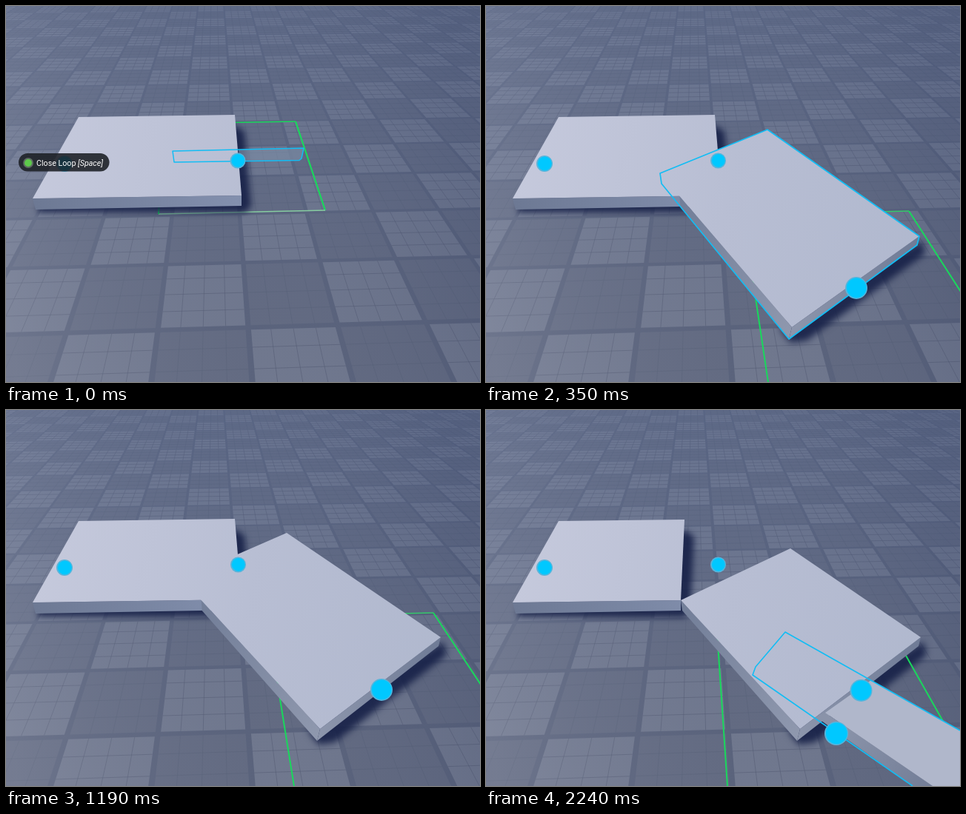
An HTML page with a canvas that plays this animation: 640x508 px, repeating every 2.31 s.

```html
<!DOCTYPE html>
<html lang="en">
<head>
<meta charset="utf-8">
<title>Block tool</title>
<style>
  html, body { margin: 0; width: 100%; height: 100%; overflow: hidden; background: #5d667f; }
  canvas { display: block; }
</style>
</head>
<body>
<canvas id="stage" width="640" height="508"></canvas>
<script>
const W = 640, H = 508, LOOP = 2310, STEP = 70;
const CYAN = '#12bdf4', GREEN = '#19d85c';
const VP = [281, -174];
const stage = document.getElementById('stage').getContext('2d');
let g = stage;

const mix = (a, b, k) => a + (b - a) * k;
const mixAll = (a, b, k) => a.map((v, i) => mix(v, b[i], k));
const mixPt = (a, b, k) => [mix(a[0], b[0], k), mix(a[1], b[1], k)];
const shift = (p, x, y) => [p[0] + x, p[1] + y];
const atY = (a, b, y) => mixPt(a, b, Math.max(0, (y - a[1]) / (b[1] - a[1])));

function trace(pts, closed = true) {
  g.beginPath();
  pts.forEach(p => g.lineTo(p[0], p[1]));
  if (closed) g.closePath();
}
function fill(pts, style) {
  trace(pts);
  g.fillStyle = style;
  g.fill();
}
function line(pts, style, width, closed = false) {
  trace(pts, closed);
  g.strokeStyle = style;
  g.lineWidth = width;
  g.lineJoin = 'round';
  g.stroke();
}
function disc(x, y, r, style) {
  g.beginPath();
  g.arc(x, y, r, 0, Math.PI * 2);
  g.fillStyle = style;
  g.fill();
}
function blend(x0, y0, x1, y1, ...stops) {
  const grad = g.createLinearGradient(x0, y0, x1, y1);
  stops.forEach((c, i) => grad.addColorStop(i / (stops.length - 1), c));
  return grad;
}
function shadow(pts, blur = 4) {
  g.save();
  g.filter = `blur(${blur}px)`;
  fill(pts, 'rgba(23,33,72,.9)');
  g.restore();
}

// Floor plane to screen: u counts columns, v counts rows going away.
function floorPt(u, v) {
  const a = 0.1695 * v, b = 0.006 * u, w = 1 + a + b;
  return [(205 + VP[0] * a + 124 * u) / w, (438 + VP[1] * (a + b)) / w];
}

function makeFloor() {
  const layer = document.createElement('canvas');
  layer.width = W;
  layer.height = H;
  g = layer.getContext('2d');
  g.fillStyle = '#59627b';
  g.fillRect(0, 0, W, H);
  for (let v = -2; v < 18; v++) {
    for (let u = -10; u < 14; u++) {
      const lit = (u + v) % 2 === 0, m = 0.03;
      fill([floorPt(u + m, v + m), floorPt(u + 1 - m, v + m),
            floorPt(u + 1 - m, v + 1 - m), floorPt(u + m, v + 1 - m)],
           lit ? '#70788e' : '#626a81');
      const ink = lit ? 'rgba(82,90,114,.55)' : 'rgba(84,92,116,.4)';
      for (let i = 1; i < 4; i++) {
        const s = i / 4;
        line([floorPt(u + s, v + m), floorPt(u + s, v + 1 - m)], ink, 1);
        line([floorPt(u + m, v + s), floorPt(u + 1 - m, v + s)], ink, 1);
      }
    }
  }
  g.fillStyle = blend(0, 0, 0, H, 'rgba(84,104,148,.3)', 'rgba(84,104,148,.12)', 'rgba(90,98,120,0)');
  g.fillRect(0, 0, W, H);
  g.fillStyle = blend(0, 400, W, 300, 'rgba(190,194,210,.2)', 'rgba(120,126,150,.04)', 'rgba(50,62,98,.2)');
  g.fillRect(0, 0, W, H);
  g = stage;
  return layer;
}

const topFill = () => blend(40, 230, 600, 330, '#c5c9dc', '#b8bed3', '#b0b8ce');

function fixedBlock(cut) {
  const back = cut ? [268, 148] : [309, 147];
  const front = cut ? [263, 257] : [318, 256];
  const low = shift(front, 0, 14);
  shadow([[45, 268], [42, 279], shift(low, 5, 9), shift(low, 13, 0), shift(back, 13, 23), shift(back, 0, 14)]);
  fill([[36, 260], front, low, [40, 275]], blend(40, 0, 318, 0, '#6d7994', '#8390ae'));
  fill([[98, 150], back, front, [36, 260]], topFill());
}

// Fields: back, right, front, left, lower front, handle, guide (top, left, right)
const drag = [
  [140, [381, 168, 571, 305, 397, 422, 234, 225, 391, 437, 485, 372, 271, 366, 558]],
  [350, [380, 167, 585, 311, 413, 434, 235, 226, 409, 450, 500, 381, 277, 381, 571]],
  [840, [379, 166, 588, 309, 420, 432, 236, 227, 417, 449, 505, 378, 275, 388, 575]],
  [1050, [379, 166, 587, 307, 424, 431, 237, 228, 420, 447, 507, 378, 274, 389, 577]]
];
const settled = [411, 187, 587, 307, 424, 431, 263, 257, 420, 447, 507, 378, 274, 389, 577];

function dragPose(t) {
  const i = drag.findIndex(k => k[0] > t);
  if (i < 0) return drag[drag.length - 1][1];
  const [a, b] = [drag[i - 1], drag[i]];
  return mixAll(a[1], b[1], (t - a[0]) / (b[0] - a[0]));
}

function corners(p) {
  const pt = i => [p[2 * i], p[2 * i + 1]];
  const c = { back: pt(0), right: pt(1), front: pt(2), left: pt(3), low: pt(4), handle: pt(5) };
  c.lowRight = shift(c.right, -3, 12);
  c.lowLeft = shift(c.left, 2, 14);
  return c;
}

function turnedBlock(c) {
  const edge = atY(c.left, c.front, 257), lowEdge = atY(c.lowLeft, c.low, 271);
  fill([edge, c.front, c.low, lowEdge], blend(260, 260, 420, 440, '#727e98', '#8f98ae'));
  fill([c.front, c.right, c.lowRight, c.low], blend(c.low[0], 0, c.right[0], 0, '#8d96ac', '#6f7b96'));
  fill([c.left, c.back, c.right, c.front], topFill());
}

function turnedShadow(c) {
  shadow([shift(c.low, -12, -14), shift(c.low, 2, 5), shift(c.low, 24, 2),
          shift(c.right, 8, 24), shift(c.right, 4, 6), shift(c.front, 0, -20)], 5);
}

function guide(top, left, right) {
  const k = (H + 12 - VP[1]) / (top - VP[1]);
  const a = [mix(VP[0], left, (top - VP[1]) / (H - VP[1])), top + 5];
  const b = [right, top];
  line([a, b], '#35c96b', 1.3);
  line([a, [mix(VP[0], a[0], k), H + 12]], GREEN, 2);
  line([b, [mix(VP[0], b[0], k), H + 12]], GREEN, 2);
}

function dot(x, y, r) {
  disc(x, y, r, '#55b5dc');
  disc(x + 0.3, y - 0.2, r - 1.6, '#00c8ff');
}

function strip(pts, body) {
  fill(body, 'rgba(121,137,163,.72)');
  line(pts, CYAN, 1.5, true);
}

function tooltip() {
  g.beginPath();
  g.roundRect(17, 199, 122.5, 24.5, 12.25);
  g.fillStyle = 'rgba(28,31,37,.88)';
  g.fill();
  disc(30, 212, 7, '#5d6962');
  disc(30, 212, 5, '#5dc94b');
  g.fillStyle = '#fff';
  g.textBaseline = 'alphabetic';
  g.font = '10.7px Roboto, sans-serif';
  g.fillText('Close Loop', 41, 215.5);
  g.font = 'italic 10.7px Roboto, sans-serif';
  g.fillText('[Space]', 97, 215.5);
}

function hoverScene() {
  line([[391, 156], [300, 157.5]], GREEN, 1.6);
  line([[391, 156], [431, 276]], GREEN, 2.2);
  line([[431, 276], [206, 281]], '#86cda0', 1.4);
  line([[206, 281], [207, 262]], GREEN, 2);
  fixedBlock(false);
  strip([[225, 196], [402, 192], [399, 206], [396, 208.5], [227, 211]],
        [[314, 194], [402, 192], [399, 206], [396, 208.5], [315, 210]]);
  dot(79, 213, 11);
  dot(313, 209, 10.5);
  tooltip();
}

// Arm that grows out of the turned block
const armThin = [405, 299, 640, 436, 391, 316, 386, 328, 636, 489, 522, 366, 512, 382, 640, 461, 498, 400, 494, 398];
const armWide = [404, 300, 640, 433, 364, 347, 360, 358, 576, 508, 520, 365, 458, 409, 603, 508, 446, 415, 473, 437];

function arm(k) {
  const p = mixAll(armThin, armWide, k);
  const pt = i => [p[2 * i], p[2 * i + 1]];
  const [a, b, c, d, e, root, nook, rim, base, knob] = [...Array(10).keys()].map(pt);
  const far = [W + 2, H + 2];
  const side = k < 0.4 ? [nook, rim, [W, 486], e, base] : [nook, rim, e, base];
  fill(side, blend(500, 400, 640, 490, '#8a93a9', '#6f7a94'));
  fill(k < 0.4 ? [root, b, rim, nook] : [root, b, far, rim, nook], '#b0b7cb');
  line([b, a, c, d, e], CYAN, 1.6);
  if (k < 0.4) line([e, [W, 486]], CYAN, 1.6);
  dot(506.5, 379, 15);
  dot(knob[0], knob[1], 16);
}

function buildScene(t) {
  const cut = t >= 1260;
  const p = cut ? settled : dragPose(t);
  const c = corners(p);
  const k = (t - 2100) / 140;
  turnedShadow(c);
  if (k < 0) guide(p[12], p[13], p[14]);
  else guide(mix(289, 300, k), mix(365, 326, k), mix(567, 549, k));
  fixedBlock(cut);
  turnedBlock(c);
  if (t < 1190) line([c.left, c.back, c.right, c.lowRight, c.low, c.lowLeft], CYAN, 1.7, true);
  dot(79, 213, 11);
  dot(313.5, 209, 10.5);
  if (k >= 0) {
    arm(Math.min(k, 1));
    return;
  }
  if (t >= 1540) {
    strip([[389, 368], [644, 361], [644, 366], [635, 374], [384, 381]],
          [[507, 365], [644, 361], [644, 366], [635, 374], [507, 378]]);
  }
  dot(c.handle[0], c.handle[1], 15);
}

const floor = makeFloor();
let start;

function frame() {
  const now = performance.now();
  if (start === undefined) start = now;
  const t = Math.floor(((now - start) % LOOP) / STEP) * STEP;
  g.drawImage(floor, 0, 0);
  if (t < 140) hoverScene();
  else buildScene(t);
  requestAnimationFrame(frame);
}
requestAnimationFrame(frame);
</script>
</body>
</html>
```
